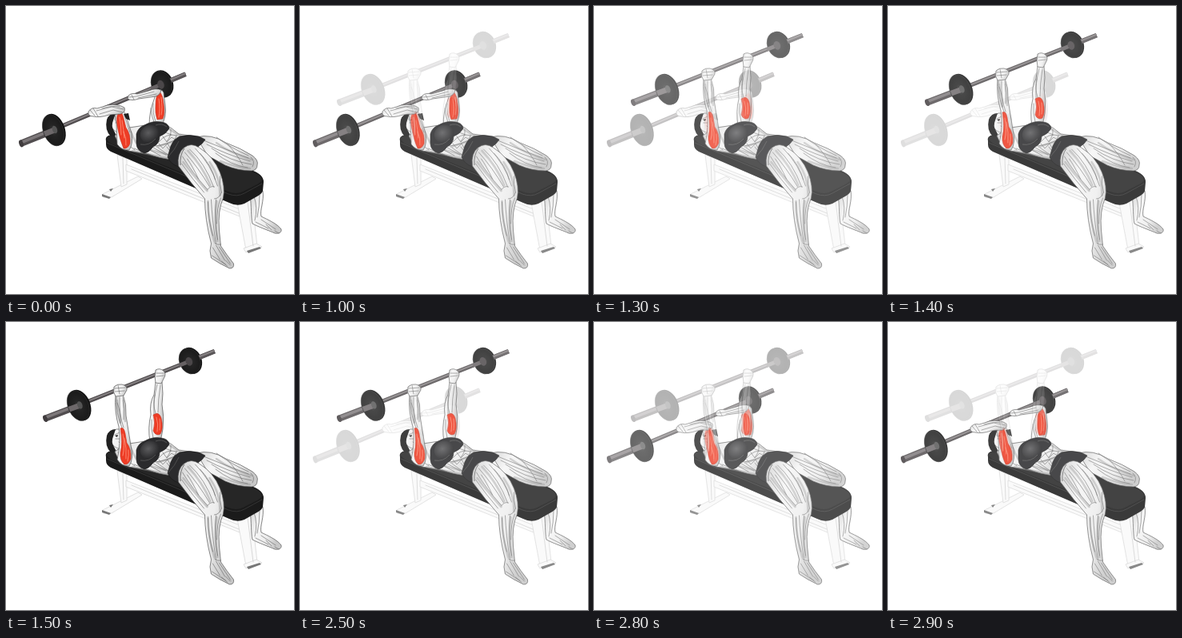
Write an HTML page that moves like this. It is 360 by 360 pixels and loops after 3000 ms.

```html
<!DOCTYPE html>
<html lang="en">
<head>
<meta charset="utf-8">
<title>Lying triceps extension</title>
<style>
html, body { margin: 0; width: 100%; height: 100%; overflow: hidden; background: #fff; }
svg { display: block; width: 100vw; height: 100vh; }
.skin { fill: url(#skin); stroke: #555; stroke-width: .7; stroke-linejoin: round; }
.red { fill: #ee3c25; stroke: #b52d1d; stroke-width: .5; }
.fiber { fill: none; stroke: #6c6c6c; stroke-width: .65; stroke-linecap: round; }
.shade { fill: none; stroke: #8a8a8a; stroke-width: 2.6; stroke-linecap: round; opacity: .4; }
.pale { fill: none; stroke: #ff9a80; stroke-width: .8; stroke-linecap: round; }
.cloth { fill: #2b2b2d; stroke: #161616; stroke-width: .6; }
.frame { fill: #fafafa; stroke: #d9d9d9; stroke-width: .8; }
.foot { fill: #777; }
.hair { fill: #202020; }
</style>
</head>
<body>
<svg viewBox="0 0 360 360">
<defs>
  <linearGradient id="skin" x1="0" y1="0" x2="1" y2=".4">
    <stop offset="0" stop-color="#cfcfcf"/><stop offset=".35" stop-color="#f6f6f6"/>
    <stop offset=".7" stop-color="#eee"/><stop offset="1" stop-color="#c8c8c8"/>
  </linearGradient>
  <radialGradient id="plate">
    <stop offset="0" stop-color="#3d3d3d"/><stop offset=".35" stop-color="#242424"/>
    <stop offset="1" stop-color="#1a1a1a"/>
  </radialGradient>
  <radialGradient id="bust" cx=".45" cy=".4" r=".6">
    <stop offset="0" stop-color="#5c5c5e"/><stop offset="1" stop-color="#262628"/>
  </radialGradient>

  <g id="body">
    <!-- bench frame -->
    <path class="frame" d="M121 235L165 213L170 216L132 239L122 239Z"/>
    <path class="frame" d="M139 186L151 191L151 223L144 226Z"/>
    <path class="frame" d="M150 198L292 254L292 263L150 206Z"/>
    <path class="frame" d="M289 246L307 238L314 300L300 305Z"/>
    <path class="frame" d="M297 303L313 297L320 301L300 308Z"/>
    <path class="fiber" style="stroke:#c4c4c4" d="M146 190L147 222M302 244L309 300M157 204L291 259"/>
    <path class="foot" d="M120 235L131 239L129 241L120 238ZM129 229L134 228L131 232ZM301 306L317 301L319 303L303 309Z"/>

    <!-- far shin and foot -->
    <path class="skin" d="M305 236L321 231C323 244 317 255 319 263C327 267 339 272 344 279C345 283 341 285 336 284C327 280 315 276 308 272C306 264 307 250 305 236Z"/>
    <path class="fiber" d="M310 238Q315 252 311 268M317 236Q317 250 314 264M319 267L337 279M325 273L332 280M312 270L328 278M336 281L341 284"/>

    <!-- pad -->
    <path d="M125 169Q123 163 131 161L151 155L306 205Q322 210 322 220L321 231Q320 235 312 239L298 247Q289 251 279 246L131 182Q125 179 125 173Z" fill="#1b1b1b"/>
    <path d="M126 167Q125 163 132 162L151 157L307 207Q319 211 320 217Q319 221 310 225L296 232Q288 236 278 232L131 172Z" fill="#262626"/>
    <path d="M126 171L278 235Q289 239 298 234L320 222" fill="none" stroke="#3c3c3c" stroke-width=".8"/>

    <!-- head -->
    <path class="skin" d="M128 146Q130 137 138 134Q145 133 147 139L151 145L153 157L140 166L131 160Z"/>
    <path class="fiber" d="M136 141L142 138M137 146L144 146M141 150L147 154M133 153Q138 160 147 158M143 141L146 145"/>
    <path class="hair" d="M126 142Q129 134 137 134L134 143Q131 150 135 156L139 164L131 163Q123 155 126 142Z"/>
    <path class="hair" d="M136 142L140 141L139 144Z"/>

    <!-- torso -->
    <path class="skin" d="M136 162Q145 155 154 152L174 149L197 147Q207 152 216 160L237 163L226 186L206 192Q191 190 178 185L153 181Q141 176 136 162Z"/>
    <path class="shade" d="M158 181L201 190M181 180L203 186M204 154L219 163M189 176L210 169M156 157Q161 170 170 182"/>
    <path class="fiber" d="M191 170Q200 158 214 162M187 175Q198 174 213 167M196 163L201 170L207 164L213 168L220 163M191 172L196 178L202 172L206 179L212 168M180 180L193 187M184 177L200 186M190 177L205 188M201 176L207 184M160 178L175 184M153 174L161 180M140 163L153 167M145 160L156 162M206 154Q207 163 201 169M199 158L207 161M213 162L208 175"/>
    <path class="cloth" d="M163 160Q165 152 173 149Q183 143 194 145Q203 146 204 153Q200 160 192 163Q192 172 184 176Q179 183 173 184Q163 181 163 171Z"/>
    <ellipse cx="180" cy="160" rx="12.5" ry="11" fill="url(#bust)" transform="rotate(-25 180 160)"/>
    <path d="M187 149Q195 146 201 151M168 173Q179 175 187 166" fill="none" stroke="#555" stroke-width=".9"/>

    <!-- far thigh -->
    <path class="skin" d="M238 164Q256 159 275 171Q294 178 308 187Q316 193 314 199Q314 205 307 206Q290 206 274 199L252 187Z"/>
    <path class="shade" d="M263 171Q282 185 307 192M268 194Q288 202 305 203"/>
    <path class="fiber" d="M247 168Q274 179 303 190M251 173Q276 186 305 194M257 178Q280 194 307 198M262 184Q281 199 302 202M263 164Q282 178 303 187M277 173Q289 185 296 199M306 189Q312 194 308 201"/>

    <!-- shorts and near leg -->
    <path class="cloth" d="M202 189L206 175Q210 166 217 163Q230 160 241 163L249 167Q246 172 240 176L230 188L216 201Q206 198 202 189Z"/>
    <g transform="translate(1.5 0)">
      <path class="skin" d="M214 200Q212 184 221 177Q230 170 240 177Q258 188 266 208Q273 226 270 240Q263 256 265 280L267 300Q275 312 283 322Q284 328 278 328Q265 322 255 315Q252 306 255 297Q247 266 247 241Q230 222 214 200Z"/>
      <path class="shade" d="M220 195Q236 216 250 231M251 244Q251 271 259 294M253 195Q267 215 266 237M226 181Q244 200 254 224M262 244Q259 268 263 294"/>
      <path class="fiber" d="M219 188Q231 208 250 229M222 183Q239 202 253 226M228 179Q247 196 258 226M235 178Q255 198 263 225M218 197Q232 217 246 233M241 184Q256 200 260 217M225 191Q231 199 239 216M250 230Q254 224 259 226M268 233Q265 241 259 241M255 242Q256 266 261 297M261 242Q258 266 263 292M251 245Q251 265 257 287M267 240Q262 251 262 272M266 213Q265 222 268 233M261 299L272 318M265 301L279 322M257 302L266 317M256 312L273 323M273 318L279 324M268 319L275 325M259 296Q262 299 267 298"/>
    </g>
    <path d="M203 188Q211 180 216 169M218 199Q217 186 223 178" fill="none" stroke="#555" stroke-width=".8"/>
  </g>

  <g id="bar">
    <path d="M18 172L224.5 85.2" stroke="#4f4b4d" stroke-width="5.2"/>
    <path d="M18 171.5L224.5 84.7" stroke="#858082" stroke-width="2"/>
    <path d="M18 172.2L58 156" stroke="#514d4f" stroke-width="8.4"/>
    <path d="M18 171L58 154.8" stroke="#7d787a" stroke-width="3.6"/>
    <ellipse cx="19" cy="172" rx="2.6" ry="4.5" fill="#403c3e" transform="rotate(-20 19 172)"/>
    <ellipse cx="60.8" cy="154.6" rx="12.8" ry="20.6" fill="#111" transform="rotate(-20 60.8 154.6)"/>
    <ellipse cx="59" cy="155.3" rx="12.4" ry="20.2" fill="url(#plate)" stroke="#333" stroke-width=".6" transform="rotate(-20 59 155.3)"/>
    <path d="M48 160L60 155.2" stroke="#6d686a" stroke-width="7"/>
    <ellipse cx="61" cy="154.5" rx="3" ry="5" fill="#555" transform="rotate(-20 61 154.5)"/>
    <ellipse cx="195.8" cy="97.2" rx="13" ry="17.4" fill="#111" transform="rotate(-20 195.8 97.2)"/>
    <ellipse cx="194.4" cy="97.8" rx="12.6" ry="17" fill="url(#plate)" stroke="#333" stroke-width=".6" transform="rotate(-20 194.4 97.8)"/>
    <path d="M181 103.5L193 98.5" stroke="#676264" stroke-width="5"/>
    <ellipse cx="193.5" cy="98.3" rx="4" ry="5.6" fill="#4b4749" transform="rotate(-20 193.5 98.3)"/>
    <path d="M206 93L224.5 85.2" stroke="#5a5658" stroke-width="6"/>
    <path d="M206 92L224.5 84.2" stroke="#858082" stroke-width="2"/>
  </g>
</defs>

<g id="lowered">
  <use href="#bar"/>
  <!-- far arm -->
  <path class="skin" d="M179 150Q179 132 185 117L188 107Q194 102 197 108L199 124Q201 139 194 150Z"/>
  <path class="red" d="M187 123Q187 111 192 107Q196 111 197 122Q199 134 196 141L189 142Q186 134 187 123Z"/>
  <path class="pale" d="M191 116Q193 130 191 139M194 114Q196 128 194 136"/>
  <path class="skin" d="M153 112Q157 108 164 110L178 106Q188 102 194 105Q193 111 187 113L166 116Q157 119 152 116Z"/>
  <path class="fiber" d="M154 114L163 113L185 107M165 115L188 110M157 111L160 117M181 128Q182 138 185 145M184 122Q183 134 187 144"/>
  <use href="#body"/>
  <!-- near arm -->
  <path class="skin" d="M138 147Q134 137 140 130Q147 128 150 137L157 159Q159 173 154 180Q145 181 139 173Z"/>
  <path class="red" d="M139 150Q137 138 141 133Q145 131 147 140L150 152Q156 160 155 172Q152 179 147 178Q142 167 139 150Z"/>
  <path class="pale" d="M142 139Q144 150 144 161M145 143Q147 155 148 165M147 157Q151 166 150 174"/>
  <path class="skin" d="M103 132Q107 126 114 128L127 124Q140 122 148 127Q150 133 143 135L129 136Q117 140 109 138Q102 138 103 132Z"/>
  <path class="fiber" d="M105 130L111 137M109 128L115 138M113 131L132 126L147 129M117 135L134 130L146 133M120 128Q134 124 142 126M148 137L155 158"/>
  <path class="hair" d="M147 135L153 134L155 143L150 141Z"/>
</g>

<g id="raised">
  <use href="#bar" transform="translate(29.5 -46) scale(1.03 .97)"/>
  <!-- far arm -->
  <path class="skin" d="M187 75L195 75Q197 90 195 103Q198 118 196 134L193 150L180 150Q177 132 181 116Q179 101 185 91Z"/>
  <path class="red" d="M184 116Q191 111 194 120Q197 133 193 140Q187 143 184 136Q187 126 184 116Z"/>
  <path class="pale" d="M188 119Q191 128 189 137M192 121Q193 130 192 135"/>
  <path class="skin" d="M187 60Q192 57 197 61Q201 65 197 71L194 77L187 76Q185 68 187 60Z"/>
  <path class="fiber" d="M188 64L197 64M188 68L197 67M189 78Q184 96 185 115M193 79Q190 98 190 113M186 91Q183 102 187 114M182 122Q181 134 184 145"/>
  <use href="#body"/>
  <!-- near arm -->
  <path class="skin" d="M137 90L146 90Q151 103 150 117Q153 136 156 154Q160 171 154 180Q145 181 139 172Q144 151 141 131Q135 111 137 90Z"/>
  <path class="red" d="M143 133Q147 130 149 139L151 151Q157 159 156 171Q153 179 148 178Q142 173 143 163Q146 151 143 133Z"/>
  <path class="pale" d="M146 140Q149 155 146 167M148 145Q151 158 150 171M153 160Q154 166 152 174"/>
  <path class="skin" d="M135 81Q139 77 145 78Q152 80 151 85L147 92L137 93Q133 88 135 81Z"/>
  <path class="shade" d="M147 98Q149 110 149 124M139 98Q140 112 143 126"/>
  <path class="fiber" d="M136 83L149 82M136 87L148 86M140 79L142 90M138 94Q137 114 145 132M142 94Q141 115 147 132M146 94Q148 109 147 122M139 101Q144 114 143 126"/>
</g>
</svg>
<script>
const DURATION = 3000;
const STEP = 100;
const LEVELS = 6;

// Each entry: [start in ms, share of the raised pose]
const steps = [[0, 0]];
for (let i = 1; i <= LEVELS; i++) steps.push([1000 + (i - 1) * STEP, i / LEVELS]);
for (let i = 1; i < LEVELS; i++) steps.push([2500 + (i - 1) * STEP, 1 - i / LEVELS]);
steps.push([DURATION, 0]);

function fade(id, opacityAt) {
  const frames = steps.map(([time, share]) => ({
    offset: time / DURATION,
    opacity: opacityAt(share),
    easing: "steps(1, end)"
  }));
  document.getElementById(id).animate(frames, { duration: DURATION, iterations: Infinity });
}

fade("lowered", share => 1 - share);
fade("raised", share => share);
</script>
</body>
</html>
```
